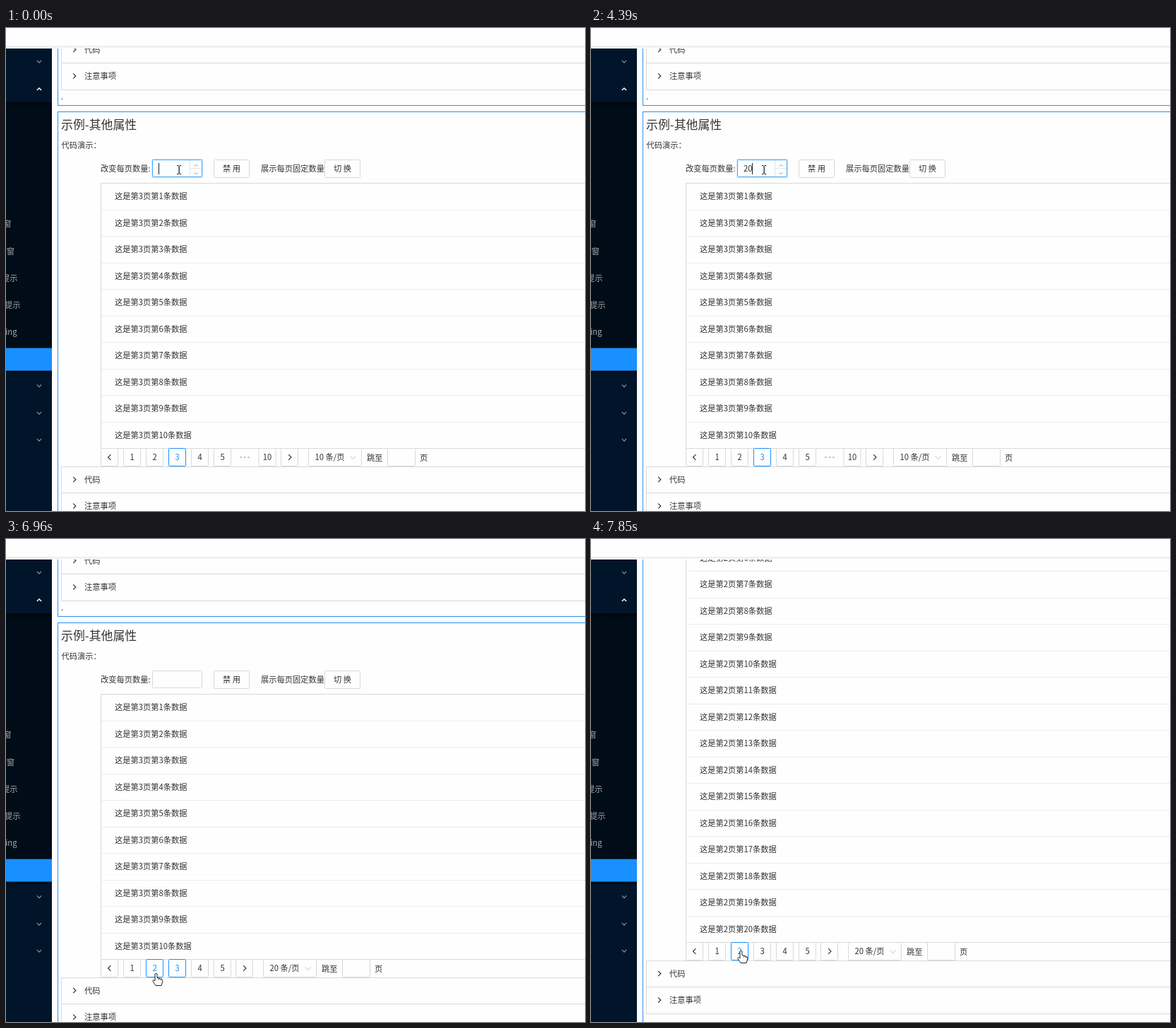
An HTML page with a canvas for the animation above (8 s loop, 820 px wide and 683 px high).

```html
<!DOCTYPE html>
<html lang="zh">
<head>
<meta charset="utf-8">
<style>
html, body { margin: 0; width: 100%; height: 100%; overflow: hidden; background: #fefefe; }
canvas { display: block; }
</style>
</head>
<body>
<canvas id="stage" width="820" height="683"></canvas>
<script>
const ctx = document.getElementById('stage').getContext('2d');
const LOOP = 8000, SIZE = 11.25, ROW = 37.5;
const BLUE = '#1890ff', FRAME = '#2c92ee', INK = '#333', BORDER = '#d9d9d9', WHITE = '#fefefe';

// Each track is a list of [start time, ...values]; the latest started entry holds.
const typing = [
  [0, '', 1], [370, '', 0], [930, '', 1], [1360, '', 0], [2010, '', 1],
  [2130, '1', 1], [2780, '1', 0], [3180, '1', 1], [3740, '', 0],
  [4270, '2', 1], [4390, '20', 1], [4970, '20', 0], [5840, '', 0]
];
const pointer = [
  [0, 'beam', 245, 200], [5100, 'arrow', 262, 245], [5250, 'arrow', 342, 313],
  [5380, 'arrow', 325, 159], [5530, 'arrow', 316.5, 128.5], [5690, 'arrow', 307.5, 154.5],
  [6120, 'arrow', 303, 172], [6240, 'arrow', 285, 245], [6360, 'arrow', 262, 350],
  [6480, 'arrow', 236, 470], [6600, 'arrow', 210, 570], [6720, 'arrow', 196, 621],
  [6840, 'hand', 212.5, 614], [7200, 'arrow', 212, 613], [7450, 'arrow', 215.5, 597],
  [7710, 'arrow', 214, 588], [7850, 'hand', 212.5, 582]
];
const scrolling = [[0, 0], [7570, 5], [7710, 230], [7850, 399]];
const at = (track, t) => track.findLast(key => key[0] <= t).slice(1);

const cursors = {
  arrow: new Path2D('M0 0V13.5L3 10.7 5 15.6 7.2 14.6 5.2 9.9H9.5Z'),
  hand: new Path2D('M-1.5 1Q0-1 1.5 1V6.5L7 8Q9.8 9 9.3 11.5L7.5 17.5H-.5L-4.5 11.5Q-4.8 9-2.8 9.8L-1.5 11ZM4.3 7.5V9.5M7 8.3V10')
};

function text(str, x, y, color = INK, size = SIZE, align = 'left') {
  ctx.font = `${size}px "Noto Sans CJK SC", "Noto Sans CJK", "Noto Sans", sans-serif`;
  ctx.textAlign = align;
  ctx.fillStyle = color;
  ctx.fillText(str, x, y + size * 0.38);
}

function rect(x, y, w, h, color) {
  ctx.fillStyle = color;
  ctx.fillRect(x, y, w, h);
}

const hline = (x, y, color) => rect(x, Math.floor(y), 820 - x, 1, color);

function box(x, y, w, h, color = BORDER) {
  ctx.fillStyle = WHITE;
  ctx.strokeStyle = color;
  ctx.lineWidth = 1;
  ctx.beginPath();
  ctx.roundRect(x + 0.5, y + 0.5, w - 1, h - 1, 1);
  ctx.fill();
  ctx.stroke();
}

function chevron(x, y, angle, color, r = 3.2, width = 1.2) {
  ctx.save();
  ctx.translate(x, y);
  ctx.rotate(angle * Math.PI / 180);
  ctx.strokeStyle = color;
  ctx.lineWidth = width;
  ctx.beginPath();
  ctx.moveTo(-r / 2, -r);
  ctx.lineTo(r / 2, 0);
  ctx.lineTo(-r / 2, r);
  ctx.stroke();
  ctx.restore();
}

function button(x, y, label, w = 25, color = INK, border = BORDER) {
  box(x, y, w, 26, border);
  text(label, x + w / 2, y + 13, color, SIZE, 'center');
}

function collapse(top) {
  rect(78, top, 1, 76, BORDER);
  ['代码', '注意事项'].forEach((label, i) => {
    const y = top + i * ROW;
    hline(78, y, BORDER);
    chevron(97, y + 18.5, 0, INK, 3.6);
    text(label, 111, y + 18.5);
  });
  hline(78, top + 2 * ROW, BORDER);
}

function controls(t) {
  const [value, caret] = at(typing, t);
  const focused = t < 5380;
  text('改变每页数量:', 134, 199);
  if (focused) rect(206, 185, 73, 27, 'rgba(24,144,255,.18)');
  box(207, 186, 71, 25, focused ? '#40a9ff' : BORDER);
  text(value, 216, 199);
  if (caret) rect(216 + Math.round(6.1 * value.length), 191, 1, 16, '#222');
  if (t < 5100) {
    rect(260, 187, 1, 23, '#e2e2e2');
    rect(261, 198, 16, 1, '#e2e2e2');
    chevron(269, 194.5, -90, '#999', 2.6, 0.9);
    chevron(269, 205.5, 90, '#999', 2.6, 0.9);
  }
  button(294, 186, '禁 用', 51);
  text('展示每页固定数量', 361, 198.5);
  button(451, 186, '切 换', 51);
}

function list(page, count) {
  rect(134, 219, 1, count * ROW + 1, BORDER);
  for (let i = 0; i <= count; i++) {
    const y = 219.5 + i * ROW;
    hline(i % count ? 135 : 134, y, i % count ? '#ececec' : BORDER);
    if (i < count) text(`这是第${page}页第${i + 1}条数据`, 154, y + 18.5);
  }
}

function pagination(y, t, page) {
  const resized = t >= 5840;
  const shift = resized ? -64 : 0;
  const hover = t >= 6960 ? BLUE : t >= 6840 ? '#5c9bd6' : null;
  box(134, y, 25, 26);
  chevron(146.5, y + 13, 180, INK, 3.8);
  for (let n = 1; n <= 5; n++) {
    const accent = n === page ? BLUE : n === 2 ? hover : null;
    button(134 + n * 32, y, n, 25, accent || INK, accent || BORDER);
  }
  if (!resized) {
    for (const x of [332.5, 338, 343.5]) {
      ctx.fillStyle = '#bfbfbf';
      ctx.beginPath();
      ctx.arc(x, y + 13, 1.3, 0, 7);
      ctx.fill();
    }
    button(357.5, y, '10');
  }
  box(389 + shift, y, 25, 26);
  chevron(402 + shift, y + 13, 0, INK, 3.8);
  box(428 + shift, y, 76, 26);
  text(`${resized ? 20 : 10} 条/页`, 437.5 + shift, y + 13);
  chevron(491.5 + shift, y + 13.5, 90, '#bfbfbf', 3.8, 1);
  text('跳至', 511 + shift, y + 13.5);
  box(540 + shift, y, 40, 26);
  text('页', 586 + shift, y + 13.5);
}

function content(t) {
  const page = t < 7200 ? 3 : 2;
  const count = t < 7200 ? 10 : 20;
  const extra = (count - 10) * ROW;
  const [scroll] = at(scrolling, t);
  ctx.save();
  ctx.translate(0, -scroll);
  rect(73, 0, 1, 110, FRAME);
  hline(73, 109, FRAME);
  collapse(12);
  text('.', 78, 97);
  rect(73, 118, 1, 1100, FRAME);
  hline(73, 118, FRAME);
  text('示例-其他属性', 78, 137, INK, 16.9);
  text('代码演示：', 78.5, 166);
  controls(t);
  list(page, count);
  pagination(594 + extra, t, page);
  collapse(620 + extra);
  ctx.restore();
}

function sidebar() {
  const dim = 'rgba(255,255,255,.65)';
  rect(0, 29, 65, 654, '#001529');
  rect(0, 105, 65, 383, '#000c17');
  const shade = ctx.createLinearGradient(0, 105, 0, 113);
  shade.addColorStop(0, 'rgba(0,0,0,.45)');
  shade.addColorStop(1, 'rgba(0,0,0,0)');
  rect(0, 105, 65, 8, shade);
  rect(0, 452.6, 65, 32, BLUE);
  [['弹窗', 7.5], ['动窗', 12], ['提示', 16.5], ['提示', 20.5], ['Loading', 15.5]].forEach(
    ([label, right], i) => text(label, right, 277 + i * 38.3, dim, SIZE, 'right'));
  for (const y of [47.5, 506, 544.5, 582.5]) chevron(47, y, 90, '#8c969f', 3.1);
  chevron(47, 86.5, -90, '#fff', 3.1, 1.5);
}

function drawPointer(t) {
  const [kind, x, y] = at(pointer, t);
  if (kind === 'beam') {
    rect(x - 0.5, y - 5, 1.3, 11, '#222');
    for (const dy of [-6, 6]) {
      rect(x - 3, y + dy, 2.5, 1, '#222');
      rect(x + 0.8, y + dy, 2.5, 1, '#222');
    }
    return;
  }
  ctx.save();
  ctx.translate(x, y);
  ctx.fillStyle = '#fff';
  ctx.strokeStyle = '#222';
  ctx.lineWidth = 1;
  ctx.lineJoin = 'round';
  ctx.fill(cursors[kind]);
  ctx.stroke(cursors[kind]);
  ctx.restore();
}

function draw(t) {
  rect(0, 0, 820, 683, WHITE);
  content(t);
  rect(0, 0, 820, 29, WHITE);
  rect(0, 25, 820, 3, '#f0f0f1');
  sidebar();
  drawPointer(t);
}

const start = performance.now();
function tick() {
  draw((performance.now() - start) % LOOP);
  requestAnimationFrame(tick);
}
tick();
</script>
</body>
</html>
```
